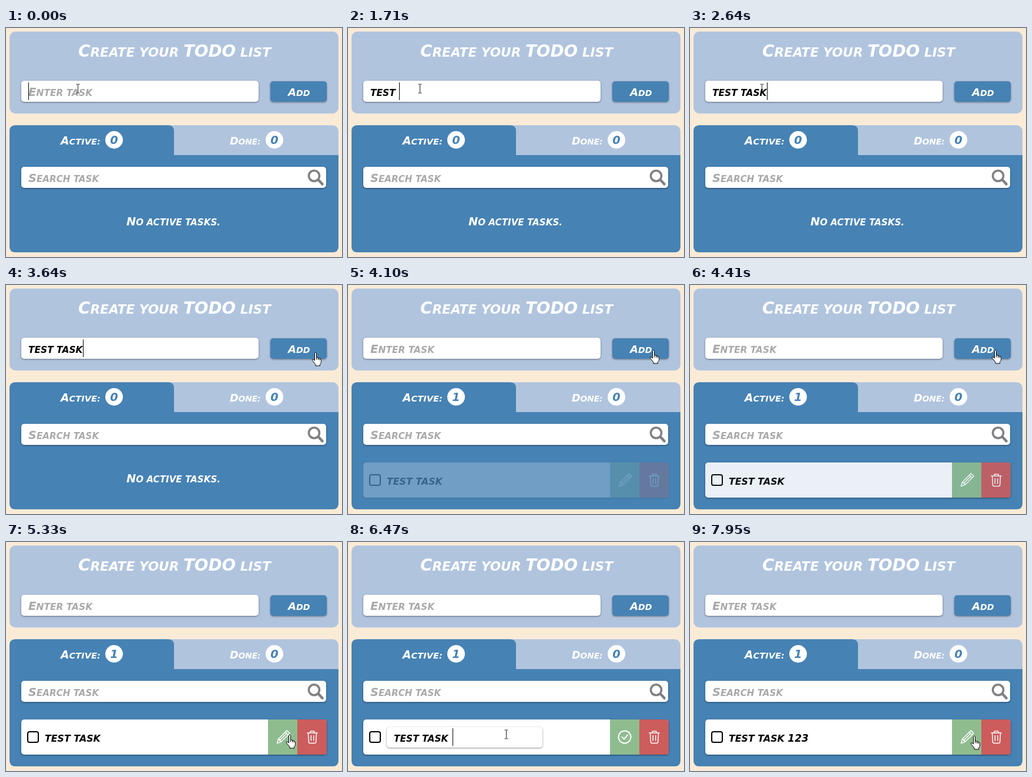
An HTML page that plays this animation: 572 by 391 pixels, repeating every 8000 ms.

```html
<!DOCTYPE html>
<html lang="en">
<head>
<meta charset="utf-8">
<title>Todo list</title>
<style>
html, body { margin: 0; width: 100%; height: 100%; overflow: hidden; background: #faebd7; }
svg { display: block; }
text { font: oblique bold 20px "DejaVu Sans", sans-serif; white-space: pre; }
.raised { filter: drop-shadow(0 1px 1.5px rgba(0, 0, 0, .45)); }
.icon { fill: none; stroke: #fff; stroke-width: 1.5; stroke-linejoin: round; stroke-linecap: round; }
</style>
</head>
<body>
<svg width="572" height="391" viewBox="0 0 572 391"><g id="base"></g><g id="live"></g></svg>
<script>
const LOOP = 8000, STEP = 76.9, MOVE_START = 3100;
const BLUE = '#4682b4', PALE = '#b0c4de', GREY = '#a9a9a9';

const rect = (x, y, w, h, fill, r = 0, attrs = '') =>
  `<rect x="${x}" y="${y}" width="${w}" height="${h}" rx="${r}" fill="${fill}" ${attrs}/>`;
const raised = (x, y, w, h, fill = '#fff') => rect(x, y, w, h, fill, 5, 'class="raised"');
const path = (d, attrs = 'class="icon"') => `<path d="${d}" ${attrs}/>`;

// Lower-case letters become smaller capitals.
const label = (x, y, size, fill, str, attrs = '') => {
  const runs = str.replace(/[a-z .:]+|\d+/g, run => {
    const scale = /\d/.test(run) ? .84 : .78;
    return `<tspan style="font-size:${(size * scale).toFixed(2)}px">${run.toUpperCase()}</tspan>`;
  });
  return `<text x="${x}" y="${y}" fill="${fill}" style="font-size:${size}px" ${attrs}>${runs}</text>`;
};
const badge = (x, n) => `<circle cx="${x}" cy="191" r="15" fill="#fff"/>` +
  label(x, 198, 23, BLUE, String(n), 'text-anchor="middle"');

const PENCIL = path('M461.5 343.5L463.5 336.5L478.3 321.9L483 326.5L468.3 341.3ZM475.6 324.6l4.6 4.6M463.5 336.5l1.8 .6 .4 2 2 .4 .6 1.8M466 338.6L477.4 327.3');
const CHECK = '<circle class="icon" cx="471" cy="333" r="10.5" style="stroke-width:2"/>' +
  path('M466.5 333l3.5 3.5 6-7', 'class="icon" style="stroke-width:2"');
const TRASH = path('M513 326h17M518 326v-2q0-1 1-1h5q1 0 1 1v2M514.5 326l.8 15q.2 2.5 2.2 2.5h8q2 0 2.2-2.5l.8-15M519.3 330.5v8.5M523.7 330.5v8.5');

document.getElementById('base').innerHTML =
  rect(6, 6, 560, 140, PALE, 10) +
  label(123, 49, 27.8, '#fff', 'Create your TODO list') +
  raised(26, 90, 404, 36) +
  raised(450, 91, 96, 35, BLUE) +
  label(480, 116, 18.2, '#fff', 'Add') +
  rect(6, 166, 560, 217, PALE, 10) +
  path('M6 176q0-10 10-10H276q10 0 10 10V217H566V373q0 10-10 10H16q-10 0-10-10Z', `fill="${BLUE}"`) +
  label(93, 199, 18.8, '#fff', 'Active:') +
  label(381, 199, 17.6, '#fff', 'Done:') + badge(457, 0) +
  raised(26, 237, 519, 36) +
  label(38, 263, 19.4, GREY, 'Search task') +
  path('M532.5 260l6 6.5', 'stroke="#808084" stroke-width="4.5" stroke-linecap="round"') +
  '<circle cx="524.5" cy="252.5" r="9" fill="none" stroke="#808084" stroke-width="3.6"/>';

// Typing: moments at which each character lands, and the caret after it.
const TASK = 'test task', EXTRA = ' 123';
const KEYS = [860, 1010, 1160, 1330, 1710, 2030, 2260, 2490, 2640];
const CARETS = [38, 48, 59, 70, 80, 87, 96, 108, 118, 131];
const EXTRA_KEYS = [6470, 6870, 7020, 7250];
const EXTRA_CARETS = [171, 178, 185, 200, 213];
const ADDED = 3990, EDIT = 5470, FOCUS = 6085, SAVED = 7860;
const typed = (keys, t) => keys.filter(k => k <= t).length;
const caret = (x, y) => rect(x, y, 1, 30, '#000');

// Pointer way points: time, x, y.
const ROUTE = [
  [3023, 122, 103], [3100, 132, 101], [3330, 300, 84], [3560, 505, 108], [3630, 527, 115],
  [3720, 527, 115], [3860, 520, 111], [4560, 520, 111], [4790, 510, 170], [5000, 490, 270],
  [5170, 478, 318], [5250, 478, 318], [5325, 483, 329], [5620, 483, 329], [5780, 440, 341],
  [6000, 300, 330], [6085, 262, 325], [6170, 262, 325], [6245, 269, 328], [7330, 269, 328],
  [7560, 400, 335], [7720, 470, 330], [7790, 484, 331]
];
function pointerAt(t) {
  const i = ROUTE.findIndex(p => p[0] > t);
  if (i === 0) return ROUTE[0].slice(1);
  if (i < 0) return ROUTE[ROUTE.length - 1].slice(1);
  const [a, b] = [ROUTE[i - 1], ROUTE[i]];
  const f = (t - a[0]) / (b[0] - a[0]);
  return [1, 2].map(k => Math.round(a[k] + (b[k] - a[k]) * f));
}

const BEAM = path('M-3 -7.5h2.5l.5 .5 .5-.5h2.5M0 -7v14M-3 7.5h2.5l.5-.5 .5 .5h2.5',
  'transform="translate(.5 .5)" fill="none" stroke="#222"');
const SKIN = 'fill="#fff" stroke="#000" stroke-linejoin="round"';
const HAND = path('M-1.5 1.5q1.5-3 3 0v7l5 1.5q3 1 3 3.5v3q0 2-2 4v2.5h-7.5v-2l-5-6.5q-2-3 1-2.5l2.5 2z', SKIN) +
  path('M1.5 8.5v4M4.5 9.5v3.5M7 10.5v3', 'fill="none" stroke="#000"');
const ARROW = path('M0 0V16l4-3.5 2.5 6 2.5-1-2.5-6H11Z', SKIN);
const inside = (x, y, l, top, r, b) => x >= l && x < r && y >= top && y < b;

function cursor(t, editing) {
  const [x, y] = pointerAt(t);
  const overButton = inside(x, y, 450, 91, 546, 126) || inside(x, y, 446, 303, 546, 363);
  const overField = inside(x, y, 26, 90, 430, 126) || inside(x, y, 26, 237, 546, 273) ||
    (editing && inside(x, y, 66, 315, 331, 351));
  const shape = overButton ? HAND : overField ? BEAM : ARROW;
  return `<g transform="translate(${x} ${y})">${shape}</g>`;
}

function newTask(t) {
  const n = t < ADDED ? typed(KEYS, t) : 0;
  const lit = t < 460 || (t >= 860 && t < 3170) || (t >= 3600 && t < 3860);
  return (n ? label(38, 116, 19.8, '#000', TASK.slice(0, n)) : label(38, 116, 19.8, GREY, 'Enter task')) +
    (lit ? caret(CARETS[n], 93) : '');
}

function item(t, q, editing) {
  const p = Math.min(1, Math.max(0, (q - ADDED) / 660));
  const alpha = 1 - (1 - p) ** 3 * (1 + 2 * p);
  const n = typed(EXTRA_KEYS, t), text = TASK + EXTRA.slice(0, n);
  return `<g opacity="${alpha}">` + raised(26, 303, 520, 60) +
    rect(446, 303, 50, 60, '#8fbc8f') +
    path('M496 303h45q5 0 5 5v50q0 5-5 5h-45z', 'fill="#cd5c5c"') +
    rect(37, 324, 18, 18, 'none', 3, 'stroke="#000" stroke-width="2"') +
    (editing
      ? raised(66, 316, 265, 35) + label(78, 341, 19.8, '#000', text) +
        (t >= FOCUS ? caret(EXTRA_CARETS[n], 318) : '') + CHECK
      : label(66, 341, 20.3, '#000', text) + PENCIL) +
    TRASH + '</g>';
}

const live = document.getElementById('live');
let shown = '';
function draw(now) {
  const t = now % LOOP;
  // The pointer and the fade advance in regular steps.
  const q = MOVE_START + Math.floor((t - MOVE_START) / STEP) * STEP;
  const added = q >= ADDED, editing = q >= EDIT - 25 && q < SAVED;
  const scene = newTask(t) + badge(184, added ? 1 : 0) +
    (added ? item(t, q, editing) : label(205, 337, 19.4, '#fff', 'No active tasks.')) +
    cursor(q, editing);
  if (scene !== shown) live.innerHTML = shown = scene;
}

const start = performance.now();
function tick() {
  draw(performance.now() - start);
  requestAnimationFrame(tick);
}
tick();
</script>
</body>
</html>
```
